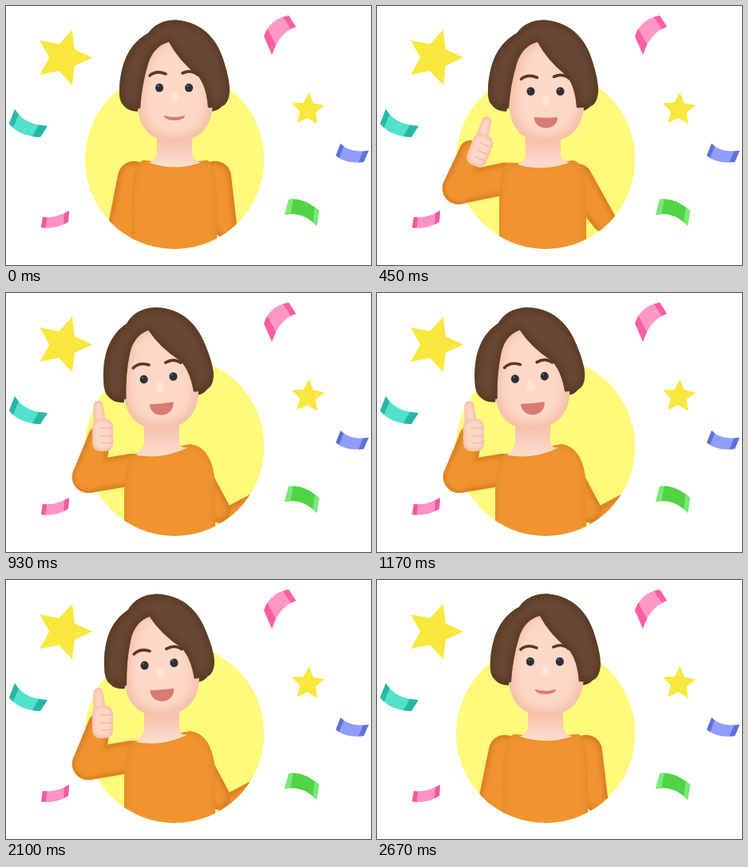
Animation of 457 by 324 pixels, one loop 2700 ms. Source, as an HTML page with a canvas:

```html
<!DOCTYPE html>
<html lang="en">
<head>
<meta charset="utf-8">
<title>Thumbs up</title>
<style>
  html, body { margin: 0; width: 100%; height: 100%; overflow: hidden; background: #fff; }
  canvas { display: block; }
</style>
</head>
<body>
<canvas id="stage" width="457" height="324"></canvas>
<script>
const ctx = document.getElementById('stage').getContext('2d');
const LOOP = 2700;
const SHIRT = '#f0942f', SHIRT_EDGE = '#d57d22', SKIN = '#fdd8c6', SKIN_EDGE = '#f4b99e';
const HAIR = '#694833', HAIR_EDGE = '#553822';

// head: x, y, tilt, face shift x, face shift y, mouth opening
// neck: x, y; collar: left x, y, right x, y; hem: left, right
// arm: shoulder, elbow, wrist; hand: x, y, angle
// other: shoulder, elbow, forearm on hip; reach: how far down the left arm may leave the disc
const rest = {
  head: [0, 0, 0, 0, 0, 0], neck: [211, 196], collar: [172, 193, 252, 193], hem: [157, 264],
  arm: [160, 214, 148, 275, 145, 335], hand: [145, 345, 60],
  other: [262, 214, 274, 275, 310, 345], reach: [190]
};
const raised = {
  head: [-3, 0, 0, 3.5, 4.5, 0.85], neck: [208, 197], collar: [166, 196, 246, 193], hem: [153, 262],
  arm: [160, 216, 102, 228, 117, 182], hand: [129, 180, 21],
  other: [250, 217, 284, 268, 305, 345], reach: [262]
};
const leaning = {
  head: [-20.5, 0.5, -5.5, 0.5, 3.5, 1], neck: [195, 198], collar: [162, 201, 230, 189], hem: [148, 262],
  arm: [158, 221, 103, 230, 117, 180], hand: [121, 177, -1],
  other: [227, 210, 266, 272, 279, 282], reach: [262]
};
const settled = { ...leaning, head: [-19.5, 0, -5, 0.5, 3, 1] };
const bounce = {
  head: [-8.5, -7, -1.5, 1, 0.5, 0.45], neck: [206, 189], collar: [164, 190, 250, 186], hem: [155, 263],
  arm: [153, 211, 118, 270, 100, 320], hand: [105, 330, 60],
  other: [251, 208, 281, 268, 310, 345], reach: [190]
};
const timeline = [
  [0, rest], [450, raised], [930, leaning], [1530, settled],
  [2100, settled], [2400, bounce], [LOOP, rest]
];

// Smooth curve through the key poses that never overshoots them
function poseAt(time) {
  const n = timeline.findIndex(([t]) => t > time) - 1;
  const [t0, from] = timeline[n], span = timeline[n + 1][0] - t0;
  const u = (time - t0) / span, pose = {};
  for (const part in from) {
    pose[part] = from[part].map((a, i) => {
      const value = k => timeline[k][1][part][i];
      const slope = k => timeline[k] && timeline[k + 1]
        ? (value(k + 1) - value(k)) / (timeline[k + 1][0] - timeline[k][0]) : 0;
      const speed = k => {
        const p = slope(k - 1), q = slope(k);
        return p * q > 0 ? 2 * p * q / (p + q) : 0;
      };
      return a + (value(n + 1) - a) * u * u * (3 - 2 * u)
        + span * u * (1 - u) * (speed(n) * (1 - u) - speed(n + 1) * u);
    });
  }
  return pose;
}

function fill(path, color) {
  ctx.fillStyle = color;
  ctx.fill(path);
}

function line(d, color, width) {
  ctx.strokeStyle = color;
  ctx.lineWidth = width;
  ctx.stroke(new Path2D(d));
}

// Fill with a soft darker rim inside the outline
function soft(path, color, edge, blur) {
  fill(path, color);
  ctx.save();
  ctx.clip(path);
  ctx.filter = `blur(${blur}px)`;
  ctx.strokeStyle = edge;
  ctx.lineWidth = blur * 2;
  ctx.stroke(path);
  ctx.restore();
}

// Hull of two circles
function limb(x1, y1, r1, x2, y2, r2) {
  const dir = Math.atan2(y2 - y1, x2 - x1);
  const gap = Math.max(Math.hypot(x2 - x1, y2 - y1), Math.abs(r1 - r2) + 0.1);
  const side = Math.acos((r1 - r2) / gap);
  const path = new Path2D();
  path.arc(x1, y1, r1, dir + side, dir - side + 2 * Math.PI);
  path.arc(x2, y2, r2, dir - side, dir + side);
  path.closePath();
  return path;
}

function sleeve(limbs) {
  for (const l of limbs) fill(limb(...l), SHIRT_EDGE);
  ctx.save();
  ctx.filter = 'blur(3px)';
  for (const [x1, y1, r1, x2, y2, r2] of limbs) fill(limb(x1, y1, r1 - 4, x2, y2, r2 - 4), SHIRT);
  ctx.restore();
}

function star(x, y, r, turn) {
  const path = new Path2D();
  for (let i = 0; i < 10; i++) {
    const a = turn + i * Math.PI / 5, d = i % 2 ? r * 0.48 : r;
    path.lineTo(x + d * Math.cos(a), y + d * Math.sin(a));
  }
  fill(path, '#f8e83e');
}

const quad = (p, t) => [0, 1].map(i =>
  (1 - t) ** 2 * p[i] + 2 * t * (1 - t) * p[i + 2] + t * t * p[i + 4]);

function ribbon(top, bottom, color, endColor, cut1, cut2) {
  const piece = (from, to, c) => {
    const path = new Path2D(), n = 10, at = i => from + (to - from) * i / n;
    for (let i = 0; i <= n; i++) path.lineTo(...quad(top, at(i)));
    for (let i = n; i >= 0; i--) path.lineTo(...quad(bottom, at(i)));
    fill(path, c);
  };
  piece(0, 1, color);
  piece(0, cut1, endColor);
  piece(cut2, 1, endColor);
}

function party() {
  star(71.7, 64.5, 36.5, 0);
  star(378, 129.5, 21.7, -0.25);
  ribbon([323, 38, 330, 16, 354, 12], [333, 61, 342, 33, 363, 26], '#ff97c6', '#fb5ea4', 0.24, 0.84);
  ribbon([11, 129, 23, 149, 52, 150], [4, 147, 16, 163, 43, 164], '#52e2cc', '#27b8a3', 0.18, 0.8);
  ribbon([419, 172, 430, 184, 454, 181], [413, 187, 425, 198, 448, 195], '#8f9dfb', '#6070d8', 0.16, 0.85);
  ribbon([354, 242, 372, 239, 392, 256], [349, 261, 372, 257, 389, 275], '#50d344', '#7be978', 0.16, 0.86);
  ribbon([46, 264, 62, 266, 79, 256], [44, 277, 62, 280, 78, 270], '#ff92c5', '#f2589d', 0.16, 0.82);
}

function body({ neck, collar, hem, arm, other }) {
  const [sx, sy, ex, ey, wx, wy] = arm;
  const [ox, oy, px, py, hx, hy] = other;
  sleeve([[hx, hy, 14, hx + 38, hy - 20, 14]]);
  sleeve([[ox, oy, 20, px, py, 15]]);
  sleeve([[sx, sy, 20, ex, ey, 20], [ex, ey, 20, wx, wy, 14]]);

  const [lx, ly, rx, ry] = collar, [hl, hr] = hem, [nx, ny] = neck;
  soft(new Path2D(`M${lx} ${ly}Q${hl} ${ly + 4} ${hl} 250V330H${hr}V250
    Q${hr} ${ry + 4} ${rx} ${ry}Q${nx} ${ny + 2} ${lx} ${ly}Z`), SHIRT, '#e08a29', 3);

  const tilt = (ry - ly) * 0.4;
  const skin = ctx.createLinearGradient(0, ny - 30, 0, ny + 4);
  skin.addColorStop(0, '#f5c1ab');
  skin.addColorStop(1, '#fddccc');
  fill(new Path2D(`M${nx - 22} 145L${nx - 22} ${ny - 10}Q${nx - 24} ${ny - 3} ${nx - 32} ${ny - tilt}
    Q${nx} ${ny + 11} ${nx + 33} ${ny + tilt}Q${nx + 23} ${ny - 3} ${nx + 22} ${ny - 12}V145Z`), skin);
}

const backHair = new Path2D('M143 105Q142 132 165 132L180 70H245L255 132Q275 132 277 105L240 60H180Z');
const face = new Path2D('M168 95C158 140 172 170 211 170C250 170 266 140 256 95L240 55L200 38L178 58Z');
const hair = new Path2D(`M204 45Q185 50 178 72Q170 98 168 128Q154 130 147 124Q141 119 142 103
  C144 68 156 46 178 34Q190 17 214 17.5C249 21 266 45 273 70Q280 92 280 106Q279 123 269 126
  Q260 128 253 127Q251 100 240 87Q216 68 204 45Z`);

function head([x, y, tilt, faceX, faceY, open]) {
  ctx.save();
  ctx.translate(211 + x, 100 + y);
  ctx.rotate(tilt * Math.PI / 180);
  ctx.translate(-211, -100);
  fill(backHair, HAIR_EDGE);
  ctx.translate(faceX, 0);
  soft(face, SKIN, SKIN_EDGE, 6);
  ctx.translate(-faceX, 0);
  soft(hair, HAIR, HAIR_EDGE, 4);

  ctx.translate(faceX, faceY);
  const top = 137 - 3 * open, w = 13 + 2 * open, low = top + 8 + 12 * open;
  fill(new Path2D(`M${211 - w} ${top}Q211 ${top + 4 - 3 * open} ${211 + w} ${top}
    C${211 + w} ${low} ${211 - w} ${low} ${211 - w} ${top}Z`), '#d97c70');
  ctx.lineCap = 'round';
  line('M180 87Q188 80 200 85M221 84Q232 79 240 86', '#5a3922', 3.6);
  for (const ex of [192, 229]) {
    fill(limb(ex, 102, 5, ex, 102.6, 5), '#2d3037');
    fill(limb(ex - 1.5, 100, 1, ex - 1.4, 100, 1), '#777b84');
  }
  ctx.filter = 'blur(2px)';
  fill(limb(211, 110, 3, 211, 116, 4), '#ffebe0');
  ctx.restore();
}

function hand([x, y, angle]) {
  ctx.translate(x, y);
  ctx.rotate(angle * Math.PI / 180);
  soft(limb(-5, -36, 6, -3, -12, 8), SKIN, SKIN_EDGE, 2);
  const fist = new Path2D();
  fist.roundRect(-13, -20, 26, 41, 10);
  soft(fist, SKIN, SKIN_EDGE, 2);
  ctx.lineCap = 'round';
  line('M-3 -9Q5 -7 12 -9M-3 1Q5 3 12 1M-2 10Q4 12 11 10', '#efb9a4', 1.3);
}

// Draw inside the disc, or left of it down to the given height
function inWindow(reach, paint) {
  ctx.save();
  const opening = new Path2D();
  opening.rect(0, 0, 150, reach);
  opening.arc(211, 192, 112, 0, 7);
  ctx.clip(opening);
  paint();
  ctx.restore();
}

function draw(now) {
  const pose = poseAt(now % LOOP), [reach] = pose.reach;
  ctx.fillStyle = '#fff';
  ctx.fillRect(0, 0, 457, 324);
  party();
  fill(limb(211, 192, 112, 211.2, 192, 112), '#fff97c');
  inWindow(reach, () => body(pose));
  head(pose.head);
  inWindow(reach, () => hand(pose.hand));
}

function frame() {
  draw(performance.now());
  requestAnimationFrame(frame);
}
frame();
</script>
</body>
</html>
```
